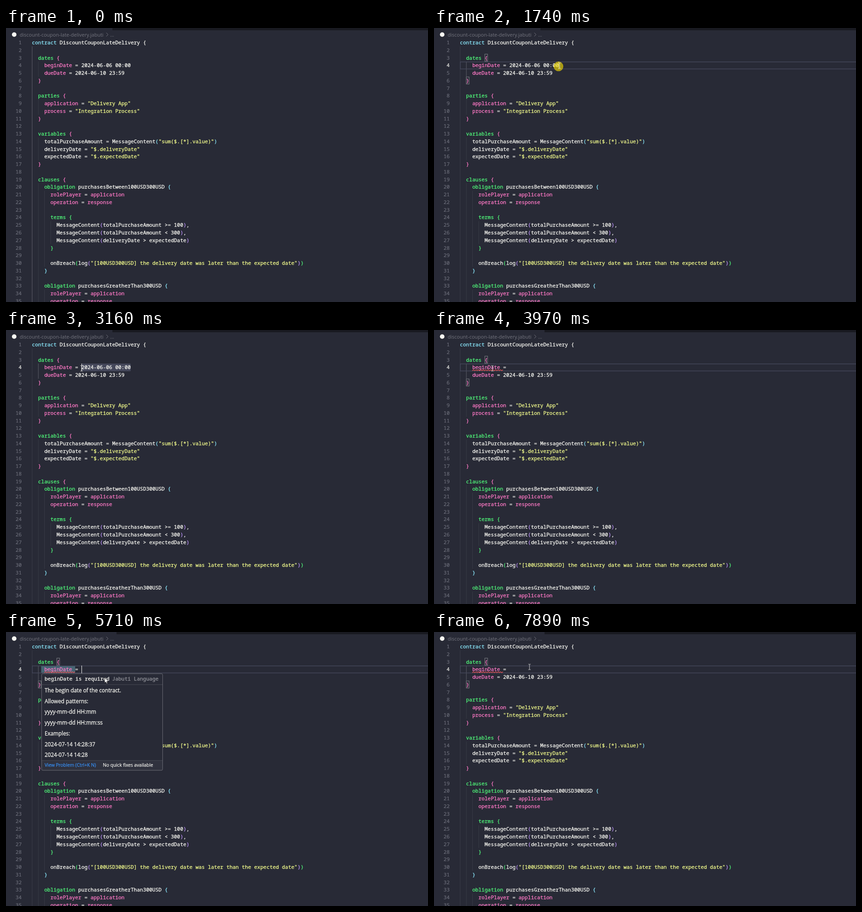
These frames come from a looping animation (928 by 604 pixels, 8000 ms). An HTML page:

```html
<!DOCTYPE html>
<html lang="en">
<head>
<meta charset="utf-8">
<title>Contract editor</title>
<style>
html, body { margin: 0; width: 100%; height: 100%; overflow: hidden; background: #282a36; }
svg { display: block; width: 928px; height: 604px; }
text {
  white-space: pre; color: #f8f8f2; fill: currentColor; stroke: currentColor; stroke-width: .3;
  font: 11.32px "Noto Sans Mono", monospace;
}
.ui { font: 11.8px "Open Sans", "Noto Sans", sans-serif; }
.crumb { font-size: 11.03px; color: #74757f; stroke: none; }
.small { font-size: 10.2px; stroke-width: .2; }
.num { color: #6d6f7b; text-anchor: end; stroke-width: .15; }
.cyan { color: #8be9fd; }
.green { color: #50fa7b; }
.pink { color: #ff79c6; }
.yellow { color: #f1fa8c; }
.purple { color: #bd93f9; }
.dim { color: #92939a; }
.link { color: #3794ff; }
</style>
</head>
<body>
<svg viewBox="0 0 928 604">
  <rect id="tabs" y="0" width="700" height="5" fill="#191a21"/>
  <circle cx="18" cy="14.5" r="5" fill="#f8f8f2"/>
  <text class="ui crumb" x="30" y="19">discount-coupon-late-delivery.jabuti</text>
  <path d="M220.5 10.5l4 4-4 4" fill="none" stroke="#74757f"/>
  <text class="ui crumb" x="229" y="19">...</text>
  <rect id="select" height="17" rx="2" fill="#44475a"/>
  <rect id="word" height="17" fill="#476574"/>
  <g id="guides"></g>
  <g id="focus" fill="none">
    <rect id="row" width="890" height="15.6" stroke="#44475a" stroke-width="1.4"/>
    <g id="pair" stroke="#888a90" stroke-width=".9"></g>
  </g>
  <g id="code"></g>
  <path id="squiggle" fill="none" stroke="#ff5555" stroke-width="1.1"/>
  <rect id="caret" width="1" height="17" fill="#f8f8f2"/>
  <g id="popup">
    <rect x="78.4" y="91.9" width="266" height="213" rx="2.5" fill="#282a36"/>
    <path d="M78.4 283.5h266v19q0 2.4-2.5 2.4h-261q-2.5 0-2.5-2.4z" fill="#30323e"/>
    <path d="M78.4 116h266M78.4 283.3h266" stroke="#4c4e58" stroke-width=".9"/>
    <rect x="78.4" y="91.9" width="266" height="213" rx="2.5" fill="none" stroke="#74767e" stroke-width=".9"/>
    <text x="85" y="107">beginDate is required</text>
    <text class="dim" x="233.5" y="107">Jabuti Language</text>
    <g id="notes"></g>
    <text class="ui small link" x="85" y="297">View Problem (Ctrl+K N)</text>
    <text class="ui small" x="213" y="297">No quick fixes available</text>
  </g>
  <circle id="halo" r="10.6" fill="#ffe600" fill-opacity=".6"/>
  <path id="beam" d="M-2.5-6h2l.5.6.5-.6h2M-2.5 6h2l.5-.6.5.6h2M0-5.4v10.8" fill="none" stroke="#d4d4d4"/>
  <path id="arrow" d="M0 0v11.2l2.6-2.4 1.8 4 1.9-.8-1.8-3.9h3.5z" fill="#fff" stroke="#111" stroke-width=".7"/>
</svg>
<script>
const X0 = 57, CW = 6.79, Y0 = 23.6, LH = 16.76, LOOP = 8000;
const $ = id => document.getElementById(id);
const colX = c => X0 + c * CW;
const rowY = n => Y0 + (n - 1) * LH;
const set = (el, attrs) => { for (const k in attrs) el.setAttribute(k, attrs[k]); return el; };
const add = (parent, tag, attrs, text = '') => {
  const el = document.createElementNS('http://www.w3.org/2000/svg', tag);
  el.textContent = text;
  parent.append(el);
  return set(el, attrs);
};
const show = (el, on) => { el.style.display = on ? '' : 'none'; };

const source = `contract DiscountCouponLateDelivery {

  dates {
    beginDate = 2024-06-06 00:00
    dueDate = 2024-06-10 23:59
  }

  parties {
    application = "Delivery App"
    process = "Integration Process"
  }

  variables {
    totalPurchaseAmount = MessageContent("sum($.[*].value)")
    deliveryDate = "$.deliveryDate"
    expectedDate = "$.expectedDate"
  }

  clauses {
    obligation purchasesBetween100USD300USD {
      rolePlayer = application
      operation = response

      terms {
        MessageContent(totalPurchaseAmount >= 100),
        MessageContent(totalPurchaseAmount < 300),
        MessageContent(deliveryDate > expectedDate)
      }

      onBreach(log("[100USD300USD] the delivery date was later than the expected date"))
    }

    obligation purchasesGreatherThan300USD {
      rolePlayer = application
      operation = response`;

const words = {
  cyan: /^contract$/,
  green: /^(dates|parties|variables|clauses|obligation|terms)$/,
  pink: /^(beginDate|dueDate|application|process|rolePlayer|operation|response)$/,
  yellow: /^"/
};
const levels = ['', 'pink', 'cyan', 'green', 'purple'];
const numbers = [];
let depth = 0, dateText;

source.split('\n').forEach((line, i) => {
  const n = i + 1, y = Math.round(rowY(n) + 12.4);
  numbers[n] = add($('code'), 'text', { class: 'num', x: 34.6, y }, n);
  for (const m of line.matchAll(/"[^"]*"|[{}()]|[\d-]+ [\d:]+|\w+|[^\s\w"{}()]+/g)) {
    const s = m[0];
    let cls = Object.keys(words).find(k => words[k].test(s)) || '';
    if (/^[{(]$/.test(s)) cls = levels[depth++];
    if (/^[})]$/.test(s)) cls = levels[--depth];
    const el = add($('code'), 'text', { class: cls, x: colX(m.index), y }, s);
    if (n === 4 && /^2024/.test(s)) dateText = el;
  }
});

// Indent guides: column, first line, last line
const [outer, inner] = [
  [0, 2, 36], [2, 4, 5], [2, 9, 10], [2, 14, 16], [2, 20, 36],
  [4, 21, 30], [4, 34, 36], [6, 25, 27]
].map(([c, a, b]) => add($('guides'), 'rect', {
  x: colX(c) + .1, y: rowY(a), width: .9, height: (b - a + 1) * LH, fill: '#3c3e49'
}));

for (const [c, n] of [[8, 3], [2, 6]])
  add($('pair'), 'rect', { x: colX(c) + .4, y: rowY(n) + .5, width: CW - .6, height: LH - 1 });

['The begin date of the contract.', 'Allowed patterns:', 'yyyy-mm-dd HH:mm', 'yyyy-mm-dd HH:mm:ss',
  'Examples:', '2024-07-14 14:28:37', '2024-07-14 14:28'
].forEach((s, i) => add($('notes'), 'text', { class: 'ui', x: 85, y: Math.round(133 + i * 23.72) }, s));

const y4 = Math.round(rowY(4));
set($('row'), { x: X0 + .8, y: y4 + .7 });
set($('word'), { x: colX(3), y: y4, width: 11 * CW });
set($('caret'), { y: y4 });
set($('select'), { y: y4 });
set($('squiggle'), { d: `M${colX(4)} ${y4 + 15.8}` + 'l2.7-2.2l2.7 2.2'.repeat(12) + 'l2.7-2.2' });

// Pointer path: time, x, y
const path = [
  [460, 754, 451], [590, 532.5, 268], [670, 532.5, 268], [1120, 246, 82], [1470, 281.5, 81],
  [1610, 281.5, 81], [1720, 277, 83], [2140, 180, 84], [2400, 170.5, 84.5], [3010, 170.5, 84.5],
  [3760, 128.5, 84.5], [5050, 128.5, 84.5], [5380, 97, 100], [5710, 217, 101], [5860, 217, 101],
  [6120, 84, 104], [6450, 268, 106], [6700, 236, 98], [6930, 210, 78], [7150, 210, 78], [7240, 210, 77]
];
const pointer = t => {
  const i = path.findIndex(p => p[0] > t);
  if (i < 0) return path[path.length - 1].slice(1);
  const [a, b] = [path[Math.max(i - 1, 0)], path[i]];
  const u = a === b ? 0 : (t - a[0]) / (b[0] - a[0]), e = u * u * (3 - 2 * u);
  return [a[1] + (b[1] - a[1]) * e, a[2] + (b[2] - a[2]) * e];
};

const PRESS = 1720, RELEASE = 2870, ERASE = 3400, HOVER = 4170, LEAVE = 7150;
const blinks = [PRESS, 2500, 3010, 3910, 4360, 4910, 5410, 5910, 6410, 6910, 7430, 7890];

function draw(t) {
  const [x, y] = pointer(t);
  const clicked = t >= PRESS, erased = t >= ERASE, hover = t >= HOVER && t < LEAVE;
  const col = t >= 2400 ? 16 : Math.min(32, Math.max(16, Math.round((x - X0) / CW)));
  const selected = clicked && !erased && col < 32;

  set($('tabs'), { x: erased ? 243 : 234 });
  set(outer, { fill: clicked ? '#3c3e49' : '#62646f' });
  set(inner, { fill: clicked ? '#62646f' : '#3c3e49' });
  numbers[4].style.color = clicked ? '#f8f8f2' : '';
  show($('select'), selected);
  set($('select'), { x: colX(col), width: (32 - col) * CW });
  show($('focus'), clicked && !selected);
  show(dateText, !erased);
  show($('squiggle'), t >= 3690);
  show($('caret'), blinks.filter(b => b <= t).length % 2);
  set($('caret'), { x: Math.round(colX(col)) });
  show($('word'), hover);
  show($('popup'), hover);
  set($('popup'), { opacity: Math.min(1, (t - HOVER + 40) / 130) });

  const over = hover && y > 91;
  show($('halo'), clicked && t < RELEASE);
  set($('halo'), { cx: x - 2.5, cy: y + 1.7 });
  show($('beam'), t >= 460 && !over);
  show($('arrow'), over);
  for (const id of ['beam', 'arrow']) set($(id), { transform: `translate(${x} ${y})` });
}

const start = performance.now();
function tick() {
  draw((performance.now() - start) % LOOP);
  requestAnimationFrame(tick);
}
tick();
</script>
</body>
</html>
```
